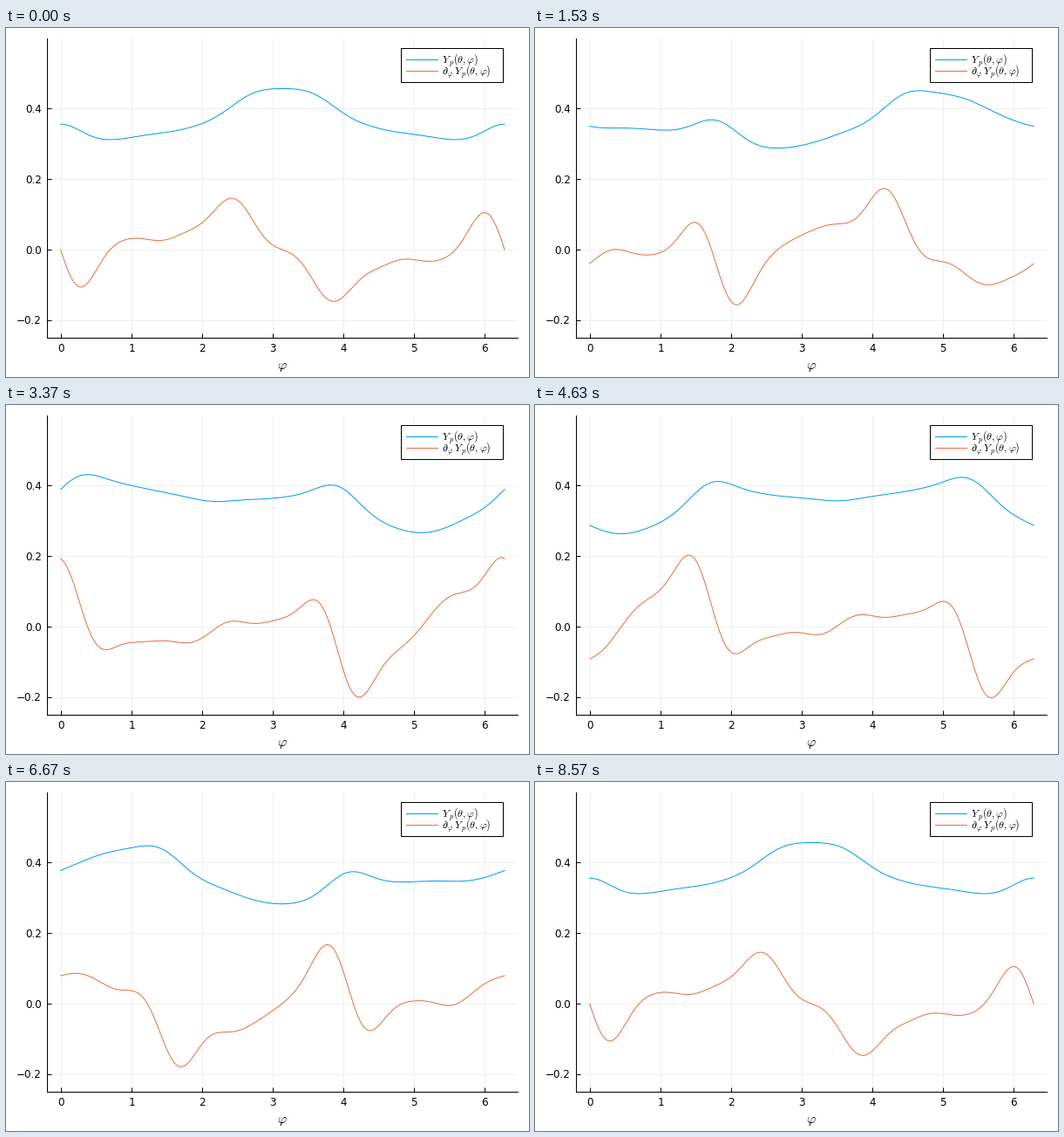
A matplotlib script for the animation above (8.61 s loop, 600 by 400 pixels).

```python
import numpy as np
import matplotlib.pyplot as plt
from matplotlib.animation import FuncAnimation
from matplotlib.patches import Rectangle

W, H, DPI = 600, 400, 100
PX = 72 / DPI
LOOP, TICK = 8610, 30
POSES = 258
BLUE, ORANGE = "#009AFA", "#E36F47"

plt.rcParams.update({"font.family": "DejaVu Sans", "mathtext.fontset": "cm"})

# Travelling waves (n, m, a): the slope is the sum of a * sin(n phi - m theta)
WAVES = [(1, 2, 48.3), (1, 1, 10), (2, 3, -84.3), (2, 4, 16),
         (3, 4, 13.6), (3, 5, -18.1), (3, 6, 10.5), (4, 6, -27), (4, 7, -4.5),
         (5, 7, 5.9), (5, 8, -35.4), (5, 9, -4), (6, 9, -7), (7, 11, -18.9),
         (8, 12, 4.9), (8, 13, -5.8), (9, 14, -4.4), (10, 16, -2.6)]
n, m, amp = np.array(WAVES).T
amp = amp / 1000
phi = np.linspace(0, 2 * np.pi, 201)


def curves(theta):
    phase = np.outer(phi, n) - m * theta
    value = 0.36 + 0.003 * np.cos(theta) - np.cos(phase) @ (amp / n)
    return value, np.sin(phase) @ amp


fig = plt.figure(figsize=(W / DPI, H / DPI), dpi=DPI, facecolor="white")
ax = fig.add_axes([47.4 / W, 1 - 355.3 / H, 540 / W, 343.7 / H])
pad = 0.03 * 2 * np.pi
ax.set(xlim=(-pad, 2 * np.pi + pad), ylim=(-0.25, 0.6),
       xticks=range(7), yticks=[-0.2, 0, 0.2, 0.4])
ax.tick_params(direction="in", length=5 * PX, width=PX,
               labelbottom=False, labelleft=False)
ax.grid(color="black", alpha=0.06, linewidth=PX)
ax.set_axisbelow(True)
ax.spines[["top", "right"]].set_visible(False)
ax.spines[["left", "bottom"]].set_linewidth(PX)
value_line, = ax.plot([], [], color=BLUE, lw=PX)
slope_line, = ax.plot([], [], color=ORANGE, lw=PX)

# Overlay in pixel coordinates for labels and legend
top = fig.add_axes([0, 0, 1, 1])
top.set(xlim=(0, W), ylim=(H, 0))
top.axis("off")


def label(x, y, text, size=12, ha="center"):
    top.text(x, y, text, size=size * PX, ha=ha, va="baseline")


for k in range(7):
    label(63 + 81.05 * k, 370.6, str(k))
for v in (-0.2, 0, 0.2, 0.4):
    label(41, 254.2 - 404.35 * v + 4.4, f"{v:.1f}".replace("-", "\u2212"),
          ha="right")
label(317.3, 391, r"$\varphi$", 16)

top.add_patch(Rectangle((453, 23), 117, 39, fc="white", ec="black", lw=PX))
for y, color, text in (
        (36, BLUE, r"$Y_{\,p}(\theta,\varphi)$"),
        (49, ORANGE, r"$\partial_\varphi\,Y_{\,p}(\theta,\varphi)$")):
    top.plot([459, 495], [y, y], color=color, lw=PX)
    label(500.5, y + 4.5, text, ha="left")


def draw(i):
    pose = min(round((i + 0.5) * TICK * POSES / LOOP), POSES - 1)
    value, slope = curves(2 * np.pi * pose / (POSES - 1))
    value_line.set_data(phi, value)
    slope_line.set_data(phi, slope)
    return value_line, slope_line


anim = FuncAnimation(fig, draw, frames=LOOP // TICK, interval=TICK,
                     repeat=True, repeat_delay=0)
plt.show()
```
